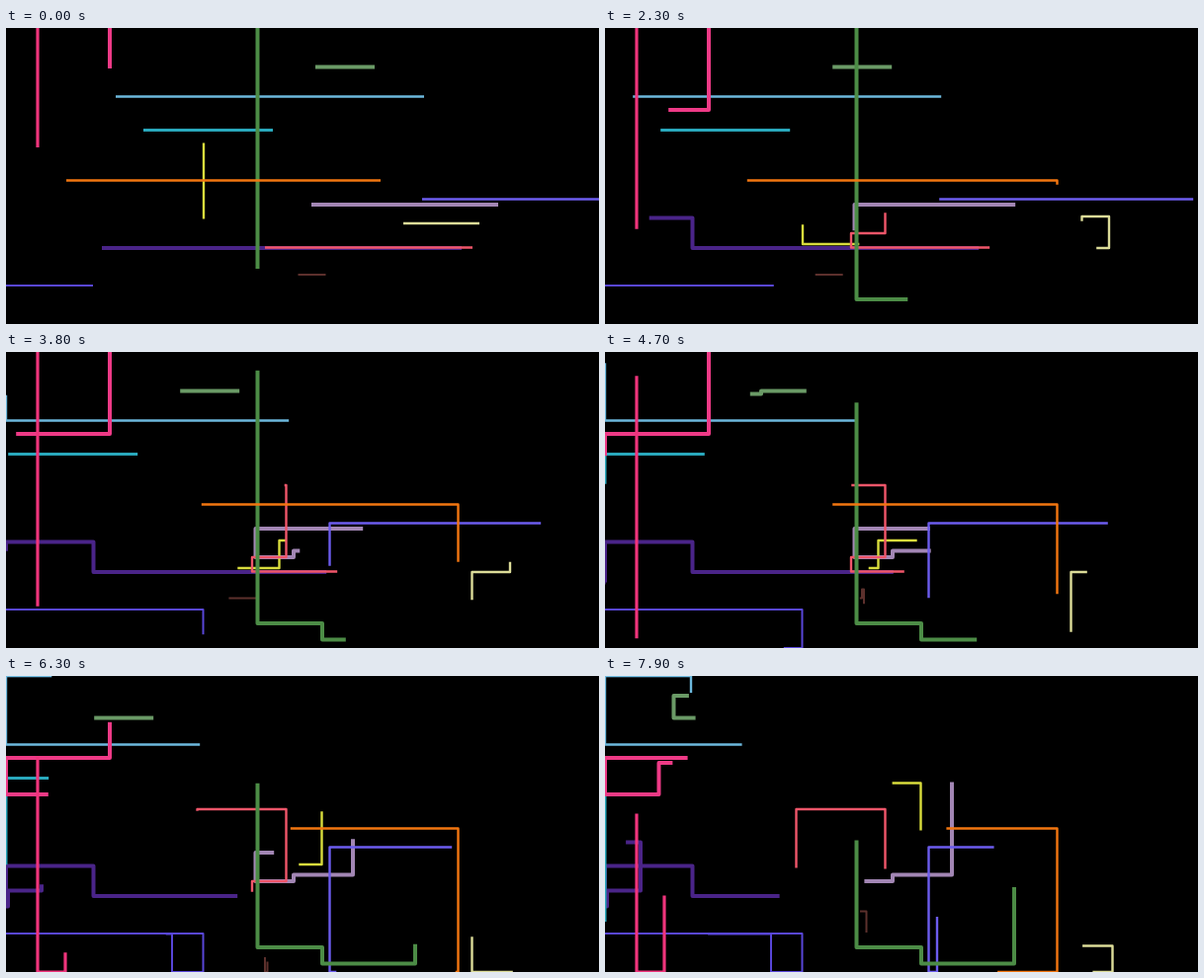
Recreate the animation shown at these times as an HTML page. Size 600 by 300 pixels, loop 8000 ms.

```html
<!DOCTYPE html>
<html>
<head>
<meta charset="utf-8">
<style>
html, body { margin: 0; height: 100%; overflow: hidden; background: #000; }
svg { display: block; width: 600px; height: 300px; }
path { fill: none; stroke-linejoin: round; }
</style>
</head>
<body>
<svg id="stage" viewBox="0 0 600 300"></svg>
<script>
// Each snake: colour, line width, body length, route from its starting tail.
const snakes = [
  ['#4a2488', 4, 364, 'M461 223H88.5V192.5H0V233.5H2V217.5H36V168.5H0'],
  ['#5846d8', 2, 388, 'M-300 261H199.5V300H168V261.5H0'],
  ['#5c302c', 2, 28, 'M323.5 250H206.3V249.5H260V240.5H262V300H264.5V238.5H200'],
  ['#a286b4', 4, 189, 'M498 179H252.5V208H291V201.5H351V0'],
  ['#6c5cee', 2.4, 257, 'M678 173.5H327.5V300H336V0'],
  ['#29a8bc', 3, 131, 'M270 103.5H0V300'],
  ['#6cb8dd', 2.4, 312, 'M423 69.5H0V0H87V200'],
  ['#d8dc3c', 2.4, 77, 'M200 116.5V219H276.5V191H319.5V108.5H0'],
  ['#dcdc98', 2.4, 77, 'M402 198H482.5V191H510V223H471.5V300H513.5V273.5H0'],
  ['#f0566a', 2.4, 210, 'M472 222.5H249V208H283.5V135H193.5V300'],
  ['#ee3a86', 4, 221, 'M105 -180V83H0V120H54.5V88H200'],
  ['#f0347c', 3.2, 266, 'M32 -145V300H60V0'],
  ['#6a9a66', 4, 60, 'M373 39.5H158V42.5H69.5V20H200'],
  ['#4c8c46', 4, 362, 'M254.5 -118V275H320V291.5H414V0'],
  ['#f27610', 2.4, 318, 'M61 154.5H457.5V300H0']
];
const STEP = 100, STEPS = 80, SPEED = 3.6;

const paths = snakes.map(([color, width, length, route]) => {
  const p = document.createElementNS('http://www.w3.org/2000/svg', 'path');
  p.setAttribute('d', route);
  p.setAttribute('stroke', color);
  p.setAttribute('stroke-width', width);
  p.setAttribute('stroke-dasharray', length + ' 5000');
  return stage.appendChild(p);
});

function draw() {
  const travelled = Math.floor(performance.now() / STEP) % STEPS * SPEED;
  for (const p of paths) p.setAttribute('stroke-dashoffset', -travelled);
  requestAnimationFrame(draw);
}
draw();
</script>
</body>
</html>
```
